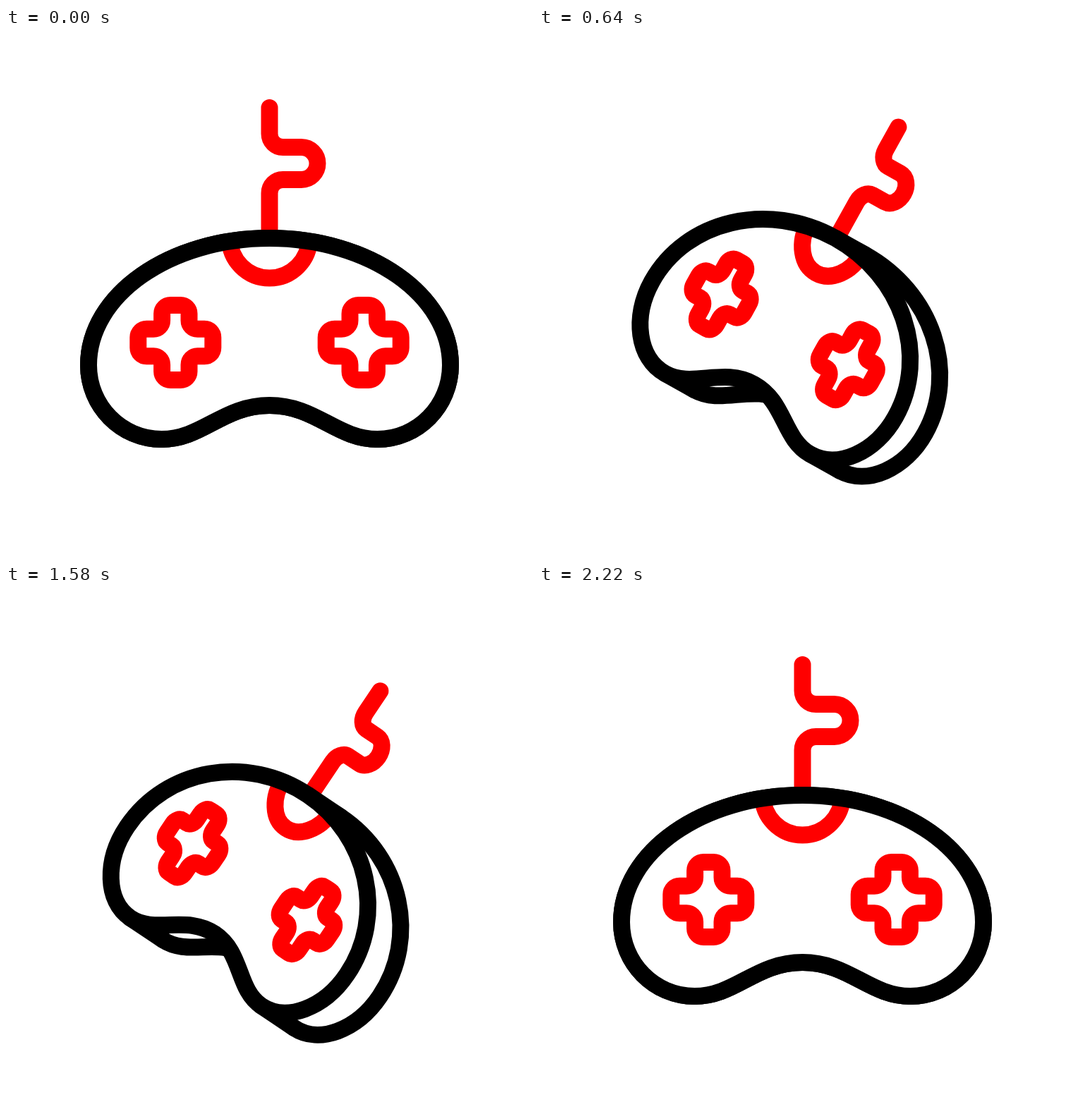
Write an HTML page with a canvas that moves like this. It is 747 by 750 pixels and loops after 2400 ms.

```html
<!DOCTYPE html>
<html lang="en">
<head>
<meta charset="utf-8">
<title>Game controller</title>
<style>
  html, body { margin: 0; width: 100%; height: 100%; overflow: hidden; background: #fff; }
  canvas { display: block; }
</style>
</head>
<body>
<canvas id="stage" width="747" height="750"></canvas>
<script>
const ctx = document.getElementById('stage').getContext('2d');
const LOOP = 2400, STEP = 20;
const CENTER = { x: 373.5, y: 446 };
const MAX_TURN = 43 * Math.PI / 180, SQUASH = 0.34, DEPTH = 71;
const RED = '#f00', BLACK = '#000', WHITE = '#fff';

const clamp = v => Math.min(1, Math.max(0, v));
const progress = (t, from, to) => clamp((t - from) / (to - from));
const smooth = v => v * v * (3 - 2 * v);

// Cubic bezier easing (0.77, 0, 0.30, 1)
function ease(x) {
  if (x <= 0 || x >= 1) return clamp(x);
  let lo = 0, hi = 1;
  for (let i = 0; i < 30; i++) {
    const m = (lo + hi) / 2, n = 1 - m;
    const at = 3 * n * n * m * 0.77 + 3 * n * m * m * 0.30 + m * m * m;
    if (at < x) lo = m; else hi = m;
  }
  return smooth(lo);
}

// All shapes are relative to CENTER in the untilted pose.
function makeBody() {
  const p = new Path2D(), k = 0.5523;
  p.moveTo(0, -148);
  p.bezierCurveTo(256.5 * k, -148, 256.5, 32 - 180 * k, 256.5, 32);
  p.bezierCurveTo(256.5, 32 + 105 * k, 153 + 103.5 * k, 137, 153, 137);
  p.bezierCurveTo(95, 137, 66, 89, 0, 89);
  p.bezierCurveTo(-66, 89, -95, 137, -153, 137);
  p.bezierCurveTo(-153 - 103.5 * k, 137, -256.5, 32 + 105 * k, -256.5, 32);
  p.bezierCurveTo(-256.5, 32 - 180 * k, -256.5 * k, -148, 0, -148);
  p.closePath();
  return p;
}

function makeCord() {
  const p = new Path2D();
  p.moveTo(0, -333);
  p.lineTo(0, -296);
  p.arcTo(0, -277, 19, -277, 19);
  p.lineTo(45, -277);
  p.arc(45, -254, 23, -Math.PI / 2, Math.PI / 2);
  p.lineTo(19, -231);
  p.arcTo(0, -231, 0, -212, 19);
  p.lineTo(0, -148);
  return p;
}

function makePad(cx) {
  const p = new Path2D(), arm = 53, half = 19.2;
  const quarter = [[-half, -arm], [half, -arm], [half, -half]];
  const points = [];
  for (let i = 0; i < 4; i++) {
    for (let [x, y] of quarter) {
      for (let r = 0; r < i; r++) [x, y] = [-y, x];
      points.push([cx + x, y]);
    }
  }
  p.moveTo(cx, -arm);
  for (let i = 1; i <= points.length; i++) {
    const a = points[i % points.length], b = points[(i + 1) % points.length];
    p.arcTo(a[0], a[1], b[0], b[1], 12);
  }
  p.closePath();
  return p;
}

function makeSocket() {
  const p = new Path2D();
  p.arc(0, -148, 56.5, 0, Math.PI);
  return p;
}

const body = makeBody(), cord = makeCord(), socket = makeSocket();
const pads = [makePad(-133.2), makePad(133.2)];
const SPARKS = [
  [178, 212, 132, 189],
  [234, 178, 220, 131],
  [296, 170, 315, 131]
];

function place(path, pose, dx, dy) {
  const c = Math.cos(pose.turn), s = Math.sin(pose.turn);
  const m = new DOMMatrix([
    c * pose.squash, s * pose.squash, -s, c,
    CENTER.x + c * dx - s * dy, CENTER.y + s * dx + c * dy
  ]);
  const placed = new Path2D();
  placed.addPath(path, m);
  return placed;
}

function stroke(path, color, cap = 'round') {
  ctx.strokeStyle = color;
  ctx.lineCap = cap;
  ctx.stroke(path);
}

function fill(path) {
  ctx.fillStyle = WHITE;
  ctx.fill(path);
}

// Straight edges joining the front face to the back face
function makeEdges(depth) {
  const p = new Path2D();
  for (const [x, y] of [[0, -148], [-153, 137], [153, 137]]) {
    p.moveTo(x, y);
    p.lineTo(x + depth, y);
  }
  return p;
}

function drawSparks(t) {
  const head = smooth(progress(t, 740, 900));
  const tail = smooth(progress(t, 950, 1080));
  if (head <= 0 || tail >= 1) return;
  const p = new Path2D();
  for (const [x0, y0, x1, y1] of SPARKS) {
    p.moveTo(x0 + (x1 - x0) * tail, y0 + (y1 - y0) * tail);
    p.lineTo(x0 + (x1 - x0) * head, y0 + (y1 - y0) * head);
  }
  stroke(p, RED);
}

function draw(t) {
  const p = t < 1115 ? ease(t / 1110) : 1 - ease(progress(t, 1115, 2220));
  const pose = { turn: MAX_TURN * p, squash: 1 - SQUASH * p };
  const dx = -38 * p - 12 * p * p, dy = -8.7 * p * p, depth = DEPTH * p;

  ctx.fillStyle = WHITE;
  ctx.fillRect(0, 0, 747, 750);
  ctx.lineWidth = 24;
  ctx.lineJoin = 'round';

  stroke(place(cord, pose, -44 * p, 0), RED);

  const back = place(body, pose, dx + depth, dy);
  const front = place(body, pose, dx, dy);
  fill(back);
  stroke(back, BLACK);
  stroke(place(makeEdges(depth / pose.squash), pose, dx, dy), BLACK);
  fill(front);
  stroke(place(socket, pose, dx, dy), RED, 'butt');
  stroke(front, BLACK);
  for (const pad of pads) stroke(place(pad, pose, dx, dy), RED);

  drawSparks(t);
}

const start = performance.now();
function tick() {
  const t = (performance.now() - start) % LOOP;
  draw(Math.floor(t / STEP) * STEP);
  requestAnimationFrame(tick);
}
tick();
</script>
</body>
</html>
```
